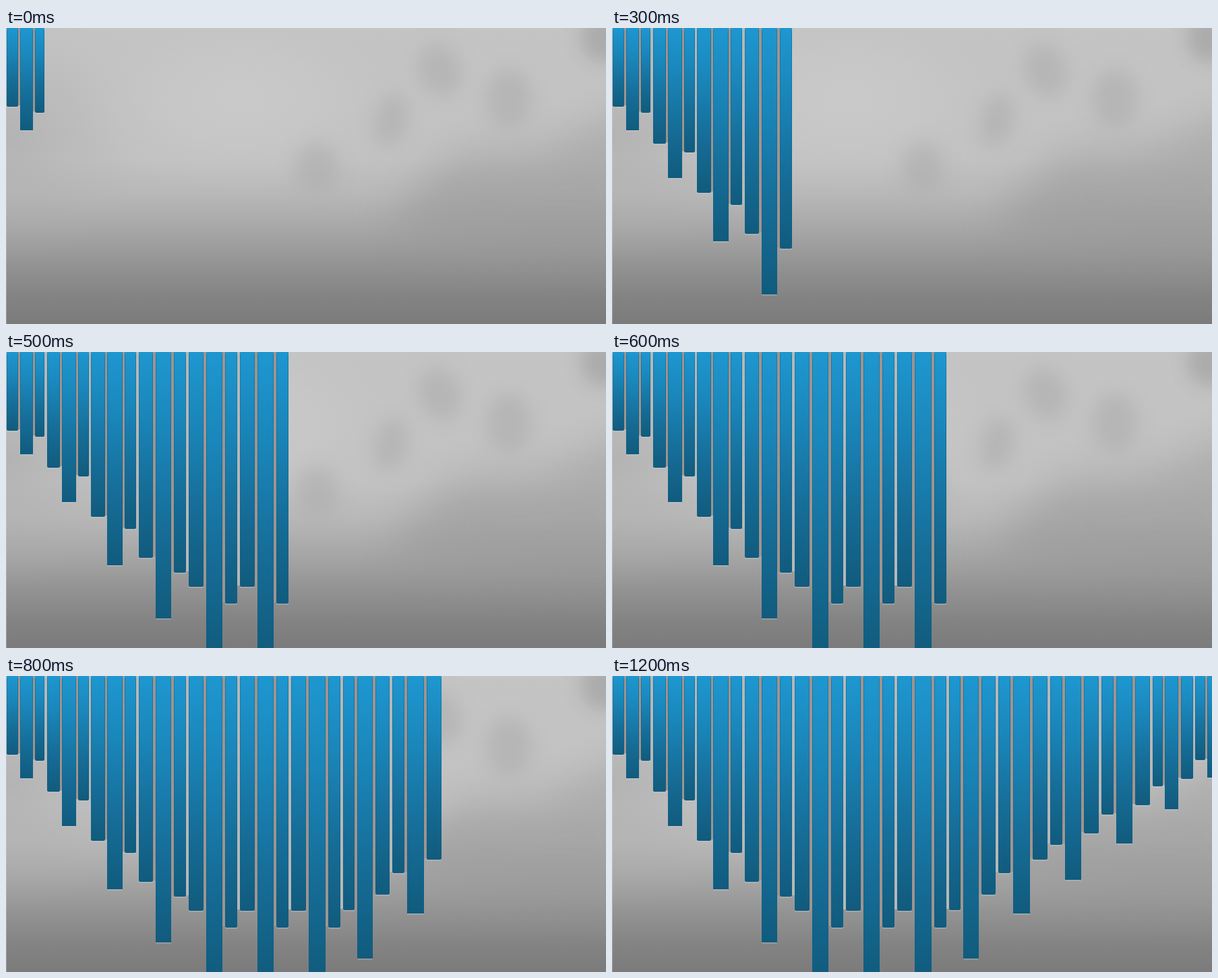
These frames come from a looping animation (890x440 px, 1.4 s). An HTML page:

```html
<!DOCTYPE html>
<html lang="en">
<head>
<meta charset="utf-8">
<title>Hanging bars</title>
<style>
  html, body { margin: 0; width: 100%; height: 100%; overflow: hidden; background: #c4c4c4; }
  svg { display: block; width: 890px; height: 440px; }
</style>
</head>
<body>
<svg viewBox="0 0 890 440">
  <defs>
    <linearGradient id="backdrop" x2="0" y2="1">
      <stop offset="0" stop-color="#c4c4c4"/>
      <stop offset=".44" stop-color="#c2c2c2"/>
      <stop offset=".56" stop-color="#b8b8b8"/>
      <stop offset=".68" stop-color="#a7a7a7"/>
      <stop offset=".8" stop-color="#939393"/>
      <stop offset=".91" stop-color="#838383"/>
      <stop offset="1" stop-color="#7b7b7b"/>
    </linearGradient>
    <radialGradient id="shade">
      <stop offset="0" stop-color="#a2a2a2" stop-opacity=".48"/>
      <stop offset="1" stop-color="#b0b0b0" stop-opacity="0"/>
    </radialGradient>
    <radialGradient id="glow">
      <stop offset="0" stop-color="#cacaca" stop-opacity=".9"/>
      <stop offset=".5" stop-color="#c8c8c8" stop-opacity=".65"/>
      <stop offset="1" stop-color="#c4c4c4" stop-opacity="0"/>
    </radialGradient>
    <linearGradient id="blue" x2="0" y2="1">
      <stop offset="0" stop-color="#1e97d0"/>
      <stop offset=".3" stop-color="#1a86ba"/>
      <stop offset=".65" stop-color="#166e99"/>
      <stop offset="1" stop-color="#115b7d"/>
    </linearGradient>
    <filter id="soft" x="-80%" y="-80%" width="260%" height="260%">
      <feGaussianBlur stdDeviation="13"/>
    </filter>
    <filter id="softer" x="-60%" y="-60%" width="220%" height="220%">
      <feGaussianBlur stdDeviation="30"/>
    </filter>
  </defs>

  <rect width="890" height="440" fill="url(#backdrop)"/>
  <ellipse cx="0" cy="160" rx="220" ry="190" fill="url(#shade)"/>
  <ellipse cx="350" cy="105" rx="250" ry="140" fill="url(#glow)"/>
  <path d="M640 205Q690 170 760 185Q840 165 950 110V330Q760 340 560 300Z"
        fill="#8e8e8e" opacity=".42" filter="url(#softer)"/>
  <g fill="#a9a9a9" opacity=".5" filter="url(#soft)">
    <ellipse cx="461" cy="207" rx="32" ry="36"/>
    <ellipse cx="571" cy="137" rx="24" ry="40" transform="rotate(12 571 137)"/>
    <ellipse cx="643" cy="62" rx="31" ry="40" transform="rotate(-20 643 62)"/>
    <ellipse cx="746" cy="106" rx="34" ry="44"/>
  </g>
  <ellipse cx="888" cy="15" rx="36" ry="36" fill="#929292" opacity=".48" filter="url(#soft)"/>
  <rect width="1" height="440" fill="#d0d0d0" opacity=".4"/>
  <g id="bars"></g>
</svg>
<script>
const LOOP = 1400, STEP = 100, PER_STEP = 3, GAP = 4;
const WIDE = { width: 24.4, reach: 1 };
const MEDIUM = { width: 22, reach: 0.773 };
const NARROW = { width: 18, reach: 0.829 };

// Each trio: length of its wide middle bar, horizontal scale
const trios = [
  [152, 0.78], [223, 0.86], [317, 0.92], [396, 0.97], [451, 1], [451, 1], [451, 1],
  [420, 0.96], [353, 1], [303, 1], [249, 1], [198, 0.82], [151, 0.82]
];
const MIRROR_FROM = 7;

const layer = document.getElementById("bars");

function add(parent, tag, attributes) {
  const node = document.createElementNS("http://www.w3.org/2000/svg", tag);
  for (const key in attributes) node.setAttribute(key, attributes[key]);
  return parent.appendChild(node);
}

function layOut() {
  const bars = [];
  let x = 1;
  trios.forEach(([length, scale], i) => {
    const kinds = i < MIRROR_FROM ? [MEDIUM, WIDE, NARROW] : [NARROW, WIDE, MEDIUM];
    for (const kind of kinds) {
      const next = x + kind.width * scale;
      bars.push({ kind, left: Math.round(x), right: Math.round(next), length: Math.round(length * kind.reach) });
      x = next + GAP * scale;
    }
  });
  return bars;
}

function drawBar({ kind, left, right, length }, previous) {
  const group = add(layer, "g", {});
  const width = right - left;

  if (previous) {
    const besideWide = kind === WIDE || previous.kind === WIDE;
    add(group, "rect", {
      x: previous.right, y: 0, width: left - previous.right,
      height: Math.min(length, previous.length) - 2,
      fill: besideWide ? "#a0948e" : "#b7b8b8"
    });
  }
  add(group, "rect", {
    x: left, y: length - 2, width, height: 3.5, rx: 1.5, fill: "#c9cdcf", opacity: 0.45
  });
  add(group, "rect", {
    x: left, y: 0, width, height: length, rx: kind === WIDE ? 0 : 2.5, fill: "url(#blue)"
  });
  add(group, "rect", {
    x: left + 0.5, y: -5, width: width - 1, height: length + 4.5, rx: kind === WIDE ? 0 : 2,
    fill: "none", stroke: "#0d5c82", "stroke-opacity": 0.45
  });
  // Square off the rounded top
  add(group, "rect", { x: left, y: 0, width, height: 3, fill: "#1e97d0" });
  return group;
}

const groups = layOut().map((bar, i, bars) => drawBar(bar, bars[i - 1]));

function draw(time) {
  const shown = PER_STEP * (1 + Math.floor((time % LOOP) / STEP));
  groups.forEach((group, i) => {
    group.style.display = i < shown ? "" : "none";
  });
}

const start = performance.now();
function tick() {
  draw(performance.now() - start);
  requestAnimationFrame(tick);
}
draw(0);
requestAnimationFrame(tick);
</script>
</body>
</html>
```
